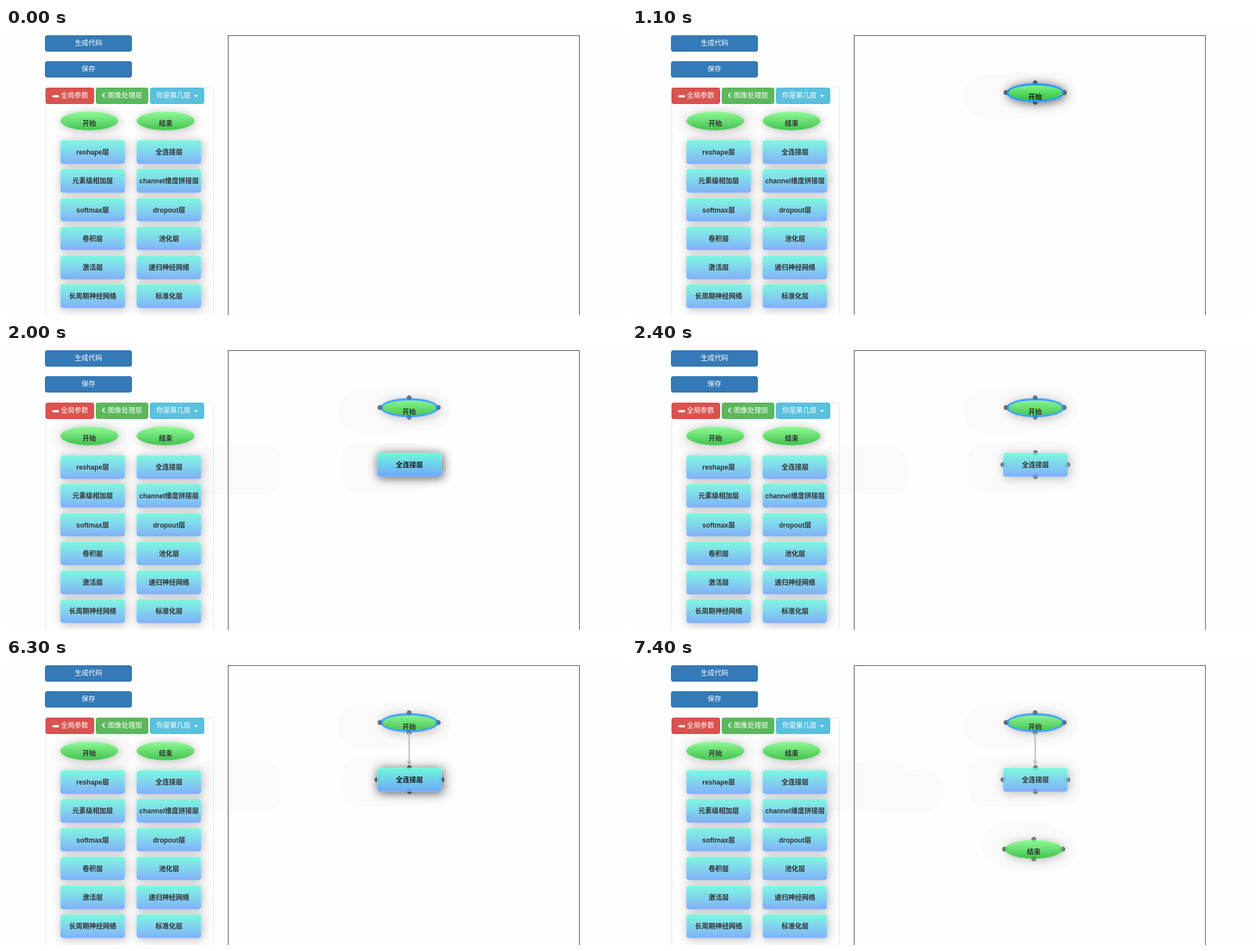
Animation, 1098 px wide and 510 px high, one loop 8000 ms. Source, as an HTML page:

```html
<!DOCTYPE html>
<html lang="zh">
<head>
<meta charset="utf-8">
<style>
html, body { margin: 0; width: 100%; height: 100%; overflow: hidden; background: #fefefe; }
body { position: relative; font: 12px "Liberation Sans", "Noto Sans CJK SC", "Noto Sans CJK", sans-serif; }
svg { position: absolute; left: 0; top: 0; }
.button, .node { position: absolute; box-sizing: border-box; white-space: nowrap; text-align: center; }
.button { height: 29px; line-height: 27px; border: 1px solid; border-radius: 4px; color: #fff; font-size: 12.2px; }
.node {
  border: 1px solid rgba(255, 255, 255, .25); color: #000; font-weight: bold; opacity: .8;
  background-origin: border-box; box-shadow: 2px 2px 16.5px #aaa;
}
.node.hover { opacity: .9; box-shadow: 2px 2px 16.5px #444; }
.layer { width: 115px; height: 42.5px; line-height: 42px; border-radius: 5px;
  background-image: linear-gradient(#60f9d8, #639cfb); }
.oval { width: 103px; height: 34px; line-height: 43.5px; border-radius: 50%;
  background-image: linear-gradient(#78fb80, #14b422); }
.oval.selected { border: 4px solid #1e90ff; }
</style>
</head>
<body>
<svg width="1098" height="510">
  <g id="halos" fill="#fafafa"></g>
  <rect x="70.5" y="106.5" width="297" height="420" rx="3" fill="none" stroke="#c9eaf1"/>
  <rect x="393.5" y="13.5" width="622" height="520" fill="none" stroke="#333"/>
  <g id="dots" fill="#343a40" fill-opacity=".8"></g>
  <g id="link">
    <circle id="grip" r="4.4" fill="#34495e"/>
    <path id="wire" stroke="#c4c4c4" stroke-width="2.6"/>
    <path id="tip" d="M0 0L-10 -4.5L-7 0L-10 4.5z" fill="#c0c0c0"/>
  </g>
</svg>
<svg width="1098" height="510" fill="#fff" style="z-index:5">
  <path d="M81 121.2l3-2h8.5q1.5 0 1.5 2t-1.5 2H84z"/>
  <path d="M333 119.3h7l-3.5 3.7z"/>
</svg>
<script>
const LOOP = 8000, STEP = 100;
const SIZE = { oval: [103, 34.5], layer: [115, 42.5] };
const $ = id => document.getElementById(id);

function svg(parent, tag, attrs) {
  const el = document.createElementNS("http://www.w3.org/2000/svg", tag);
  for (const key in attrs) el.setAttribute(key, attrs[key]);
  return parent.appendChild(el);
}

function box(className, text, x, y) {
  const el = document.createElement("div");
  el.className = className;
  el.textContent = text;
  document.body.appendChild(el);
  move(el, x, y);
  return el;
}

function move(el, x, y) {
  el.style.left = x + "px";
  el.style.top = y + "px";
}

function show(el, on) {
  el.style.display = on ? "" : "none";
}

function button(text, x, y, width, fill, edge, indent) {
  const el = box("button", text, x, y);
  Object.assign(el.style, { width: width + "px", background: fill, borderColor: edge });
  if (indent) Object.assign(el.style, { textAlign: "left", paddingLeft: indent + "px" });
}

button("生成代码", 69, 13, 154, "#337ab7", "#2e6da4");
button("保存", 69, 59, 154, "#337ab7", "#2e6da4");
button("全局参数", 70, 106, 86, "#d9534f", "#d43f3a", 26);
button("€ 图像处理层", 159, 106, 93, "#5cb85c", "#4cae4c", 10);
button("你是第几层", 255, 106, 96, "#5bc0de", "#46b8da", 10);

const palette = {};
[
  "开始", "结束", "reshape层", "全连接层", "元素级相加层", "channel维度拼接层", "softmax层", "dropout层",
  "卷积层", "池化层", "激活层", "递归神经网络", "长周期神经网络", "标准化层"
].forEach((name, i) => {
  const kind = i < 2 ? "oval" : "layer";
  const x = 96 + (i % 2) * 135.3, y = 148 + (i >> 1) * 51.2;
  palette[name] = { kind, x, y, el: box("node " + kind, name, x, y) };
});

// progress: share of the way covered at each step; bow: vertical bend of the path
const drags = [
  { name: "开始", x: 662.5, y: 97.5, bow: 0, progress: [.003, .9, 1],
    hoverAt: 200, start: 600, dotsAt: 900, restAt: 1200, selectAt: 1100 },
  { name: "全连接层", x: 657, y: 195, bow: 28, progress: [.277, .9, 1],
    hoverAt: 1300, start: 1800, dotsAt: 2100, restAt: 2400 },
  { name: "结束", x: 660, y: 322.5, bow: -40, progress: [.003, .455, .95, 1],
    hoverAt: 6800, start: 6900, dotsAt: 7200, restAt: 7400 }
];
const LINKED = { node: "全连接层", from: 6200, to: 6400 };

// Moved shadows leave a faint patch behind
function halo(kind, x, y, time) {
  const [w, h] = SIZE[kind];
  const el = svg($("halos"), "rect", {
    x: x - 20, y: y - 20, width: w + 44, height: h + 44, rx: kind === "oval" ? 45 : 28
  });
  return { el, time };
}

const halos = [];
for (const drag of drags) {
  const home = palette[drag.name];
  const [w, h] = SIZE[home.kind];
  drag.path = drag.progress.map(p => [
    home.x + (drag.x - home.x) * p,
    home.y + (drag.y - home.y) * p + drag.bow * p * (1 - p)
  ]);
  drag.path.forEach(([x, y], i) => halos.push(halo(home.kind, x, y, drag.start + (i + 1) * STEP)));
  drag.el = box("node " + home.kind, drag.name, 0, 0);
  drag.dots = svg($("dots"), "g", {});
  for (let i = 0; i < 4; i++) {
    const angle = i * Math.PI / 2;
    svg(drag.dots, "circle", {
      cx: drag.x + w / 2 * (1 + Math.cos(angle)), cy: drag.y + h / 2 * (1 + Math.sin(angle)), r: 4.4
    });
  }
}

const within = (t, from, to) => t >= from && t < to;

function renderLink(t) {
  const moment = [5700, 5800, 6000, LINKED.from].filter(time => time <= t).pop();
  show($("link"), moment);
  if (!moment) return;
  const u = (moment - 5700) / 500;
  const x = 719 - 5 * u, y = 172 + 19.5 * u ** .4;
  const angle = Math.atan2(y - 132, x - 714);
  $("wire").setAttribute("d", `M714 132L${x - 5 * Math.cos(angle)} ${y - 5 * Math.sin(angle)}`);
  $("tip").setAttribute("transform", `translate(${x} ${y}) rotate(${angle * 180 / Math.PI})`);
  $("grip").setAttribute("cx", x);
  $("grip").setAttribute("cy", y);
  show($("grip"), t < LINKED.from);
}

function render(t) {
  for (const drag of drags) {
    const step = Math.min(Math.floor((t - drag.start) / STEP), drag.path.length - 1);
    const linking = drag.name === LINKED.node && within(t, LINKED.from, LINKED.to);
    show(drag.el, step >= 0);
    if (step >= 0) move(drag.el, ...drag.path[step]);
    drag.el.classList.toggle("hover", linking || within(t, drag.start, drag.restAt));
    drag.el.classList.toggle("selected", t >= drag.selectAt);
    palette[drag.name].el.classList.toggle("hover", within(t, drag.hoverAt, drag.start));
    show(drag.dots, t >= drag.dotsAt);
  }
  for (const { el, time } of halos) show(el, t >= time);
  renderLink(t);
}

const start = performance.now();
function tick() {
  render((performance.now() - start) % LOOP);
  requestAnimationFrame(tick);
}
tick();
</script>
</body>
</html>
```
